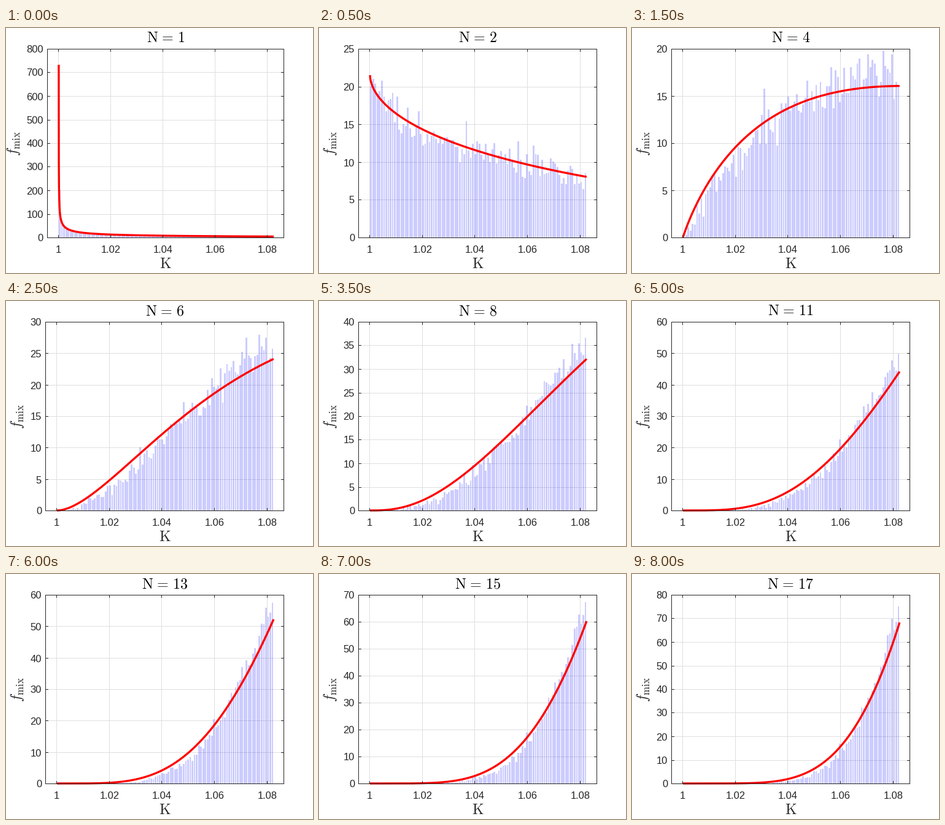
A matplotlib script that plays this animation: 500 by 400 pixels, repeating every 8.5 s.

```python
import numpy as np
import matplotlib.pyplot as plt
from matplotlib.animation import FuncAnimation
from matplotlib.collections import LineCollection, PolyCollection

plt.rcParams["mathtext.fontset"] = "cm"

PX = 0.72                      # points per pixel at 100 dpi
INK = (0.15, 0.15, 0.15)
GRID = (0.874, 0.874, 0.874)
TOP, BOTTOM, RIGHT = 34, 342, 453
K_LO, K_HI = 0.9958, 1.0864    # horizontal axis limits
K_MAX = 1 / np.cos(np.pi / 8)
TILT = 1 - np.sqrt(0.5)
STEPS, DRAWS, BINS = 17, 10000, 100


def cdf(k):
    u = np.arccos(1 / k) * 8 / np.pi
    return (1 + TILT) * u - TILT * u * u


def pdf(k):
    u = np.arccos(1 / k) * 8 / np.pi
    slope = 1 + TILT - 2 * TILT * u
    return 8 / np.pi * slope / (k * np.sqrt(k * k - 1))


# Row n - 1 holds the running maximum of n uniform draws per trial.
rng = np.random.default_rng(7)
MAXIMA = np.maximum.accumulate(rng.random((STEPS, DRAWS)), axis=0)
EDGES = np.linspace(1, K_MAX, BINS + 1)
CURVE_K = np.arange(1 + 1e-5, K_MAX, 1e-5)


def bar_heights(n):
    # The sampled law leans slightly more to large K than the curve.
    lean = 1.2 - 0.65 / (n + 1)
    counts, _ = np.histogram(MAXIMA[n - 1], cdf(EDGES).clip(0, 1) ** lean)
    return counts / (DRAWS * (EDGES[1] - EDGES[0]))


def axis_scale(n, dens):
    """Upper limit and tick step of the vertical axis."""
    peak = max(dens.max(), 4.6 * n, 50 / n)
    step = 100 if peak > 100 else 10 if peak > 40 else 5
    return int(np.ceil(peak / step)) * step, step


fig = plt.figure(figsize=(5, 4), dpi=100, facecolor="white")
ax = fig.add_axes([0, 0, 1, 1])


def lines(segments, color, z):
    # Whole-number positions are snapped to the centre of that pixel.
    ax.add_collection(LineCollection(segments, colors=[color], linewidths=PX,
                                     antialiaseds=False, zorder=z))


def label(x, y, text, size, color=INK, **kw):
    kw = {"ha": "center", "va": "baseline", **kw}
    ax.text(x, y, text, fontsize=size * PX, color=color, zorder=6, **kw)


def draw(frame):
    n = frame + 1
    left = 68 if n == 1 else 65
    mid = (left + RIGHT) / 2 - 0.5
    dens = n * cdf(CURVE_K) ** (n - 1) * pdf(CURVE_K)
    top, step = axis_scale(n, dens)

    def to_x(k):
        return left + (k - K_LO) / (K_HI - K_LO) * (RIGHT - left)

    def to_y(v):
        return BOTTOM - np.asarray(v) / top * (BOTTOM - TOP)

    ax.clear()
    ax.set(xlim=(0, 500), ylim=(400, 0))
    ax.axis("off")

    # Grid, ticks and their labels
    x0, x1 = left - 1, RIGHT - 1
    grid, ticks = [], []
    for i in range(5):
        k = 1 + 0.02 * i
        x = int(to_x(k) - 0.4)
        grid.append([(x, TOP), (x, BOTTOM)])
        ticks += [[(x, TOP), (x, TOP + 4)], [(x, BOTTOM), (x, BOTTOM - 4)]]
        label(x + 0.5, 367, f"{k:.2f}" if i else "1", 16.5,
              family="Liberation Sans")
    for v in range(0, top + 1, step):
        y = round(float(to_y(v)))
        grid.append([(x0, y), (x1, y)])
        ticks += [[(x0, y), (x0 + 4, y)], [(x1, y), (x1 - 4, y)]]
        label(x0 - 6, y + 6.5, str(v), 16.5, ha="right",
              family="Liberation Sans")
    lines(grid, GRID, 1)
    box = [(x0, TOP), (x1, TOP), (x1, BOTTOM), (x0, BOTTOM), (x0, TOP)]
    lines(ticks + [box], INK, 5)

    # Histogram
    centers = to_x((EDGES[:-1] + EDGES[1:]) / 2)
    half = 0.4 * (centers[1] - centers[0])
    tops = to_y(np.minimum(bar_heights(n), top))
    bars = [[(c - half, BOTTOM), (c - half, y), (c + half, y),
             (c + half, BOTTOM)] for c, y in zip(centers, tops)]
    ax.add_collection(PolyCollection(bars, facecolors=[(0, 0, 1, 0.2)],
                                     edgecolors="none", zorder=2))

    # Density of the maximum of n draws
    ax.plot(to_x(CURVE_K), to_y(dens), color="red", lw=3.33 * PX, zorder=4,
            solid_capstyle="butt", solid_joinstyle="round")

    gap = r"\hspace{0.133}"
    label(mid, 23, rf"$\mathrm{{N}}{gap}={gap}{n}$", 24, "black")
    label(mid, 392, r"$\mathrm{K}$", 24)
    label(19 if n == 1 else 25, 188, r"$f_{\mathrm{mix}}$", 24,
          rotation=90, rotation_mode="anchor")
    return []


anim = FuncAnimation(fig, draw, frames=STEPS, interval=500, repeat=True)
plt.show()
```
